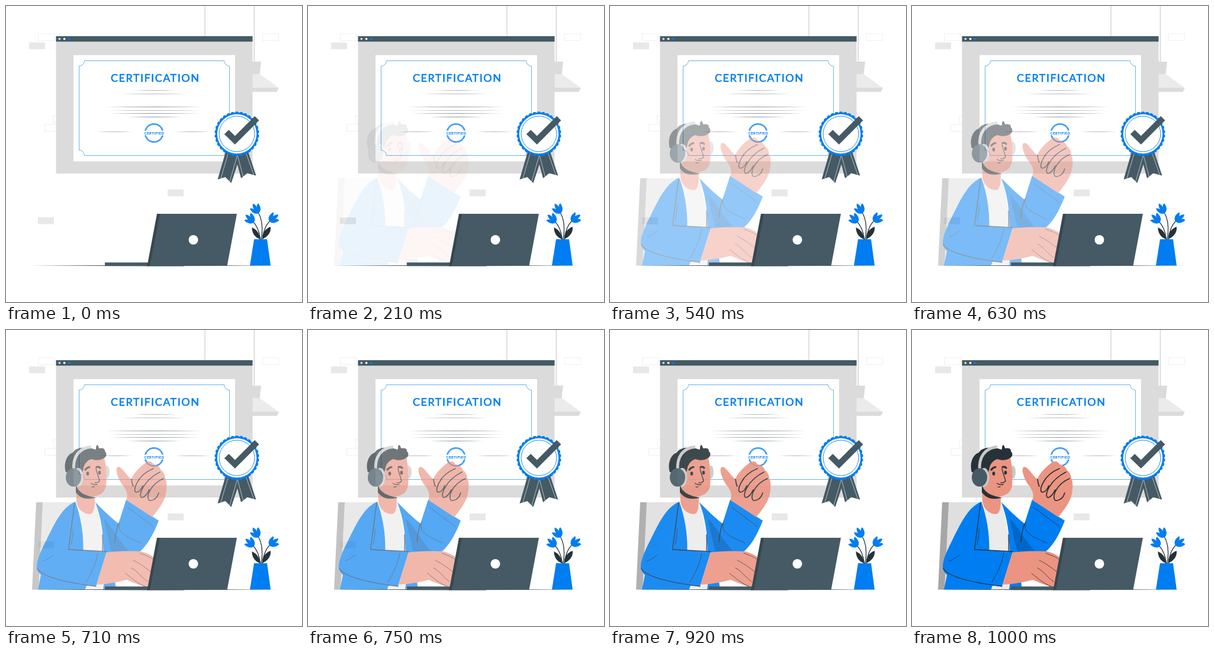
Animation of 500 by 500 pixels, one loop 1040 ms. Source, as an HTML page:

```html
<!DOCTYPE html>
<html lang="en">
<head>
<meta charset="utf-8">
<title>Certification</title>
<style>
  html, body { margin: 0; width: 100%; height: 100%; overflow: hidden; background: #fff; }
  svg { display: block; width: 100%; height: 100%; }
  text { font-family: Lato, Inter, sans-serif; fill: #007df0; stroke: #007df0; stroke-linejoin: round; }
  .blue { fill: #007df0; }
  .slate { fill: #455a64; }
  .ink { fill: #263238; }
  .skin { fill: #eb9481; }
  .pen { fill: none; stroke: #263238; stroke-width: 1.3; stroke-linecap: round; stroke-linejoin: round; }
  .thin { stroke-width: .8; }
  .bold { stroke-width: 1.7; }
  .ring { fill: none; stroke: #007df0; stroke-width: .6; }
  .cog { stroke-width: 2.2; stroke-dasharray: 1.7 .6; }
</style>
</head>
<body>
<svg viewBox="0 0 500 500">
  <g id="wall">
    <path d="M336 0V51M419.300 0V94" stroke="#a6a6a6" stroke-width=".7" fill="none"/>
    <g id="bricks"></g>
    <path d="M416 94H431L428.500 116H416Z" fill="#dbdbdb"/>
    <path d="M416 115H428.500L461 138.500H416Z" fill="#ebebeb"/>
    <path d="M416 138H461L457.500 145H416Z" fill="#dbdbdb"/>
  </g>

  <g id="window">
    <rect x="84.500" y="51" width="332" height="232" fill="#dbdbdb"/>
    <rect x="84.500" y="51" width="332" height="9.200" class="slate"/>
    <circle cx="90.300" cy="55.600" r="1.900" fill="#b9d9ee"/>
    <circle cx="98.600" cy="55.600" r="1.900" fill="#fff"/>
    <circle cx="106.900" cy="55.600" r="1.900" class="blue"/>
    <rect x="114" y="83" width="273" height="179.500" fill="#fff"/>
    <path class="ring" d="M132.500 92.500H368.500A9 9 0 0 0 377.500 101.500V243.500A9 9 0 0 0 368.500 252.500H132.500A9 9 0 0 0 123.500 243.500V101.500A9 9 0 0 0 132.500 92.500Z"/>
    <text x="177" y="127.800" font-size="18" letter-spacing="1.5" stroke-width=".6">CERTIFICATION</text>
    <g id="rules" fill="#607078"></g>
    <g id="seal">
      <path class="ring cog" d="M235.200 210.500A15.300 15.300 0 0 1 264.800 210.500M235.200 218.500A15.300 15.300 0 0 0 264.800 218.500"/>
      <path class="ring" d="M236.500 210A14.200 14.200 0 0 1 263.500 210M236.500 219A14.200 14.200 0 0 0 263.500 219"/>
      <text x="233.700" y="216.600" font-size="5.800" letter-spacing=".6" stroke-width=".25">CERTIFIED</text>
    </g>
  </g>

  <g id="person" opacity="0">
    <path d="M61 291H126L122 438.500H54Z" fill="#dfdfdf"/>
    <path d="M51 291H62L55 438.500H44Z" fill="#a6a6a6"/>

    <!-- torso -->
    <path d="M117 290H152L168 375L165 438.500H132Z" fill="#ebebeb"/>
    <path class="blue" d="M166 424H184L186 438.500H164Z"/>
    <path class="blue" d="M151 291C164 304 177 317 190 327L203 286.500L258 322C249 345 239 364 224 376H164.500C165 345 161 318 151 291Z"/>
    <path d="M165 319C179 330 184 347 208 374H178C173 355 169 337 165 319Z" fill="#0067c8"/>
    <path class="blue" d="M117 290C94 300 83 326 70 351C60 371 51 389 52 402C53 408 57 411 59 414L54 438.500H133.500L136 432L152 433L170 375L130.500 372C131 342 126 315 117 290Z"/>
    <path class="pen" d="M116 292C113 312 110 340 105.500 370.500C126 373 148 372 170 374.500M53 403C62 419 113 428 152 433M163 346Q164 360 163 373M190 327C186 338 185 347 184 358"/>
    <path class="pen thin" d="M155 377C152 395 143 413 135 426M206 300L249 332M192 324C187 340 196 346 228 360M63 390C68 389 74 384 80 380M110 362C112 352 114 344 113 336"/>

    <!-- typing hand -->
    <path class="skin" d="M170 375.500C190 373 215 373 229 374C239 377 247 381 252 386L241 434H235C223 430 213 426 204 422C191 425 178 429 153 430Z"/>
    <path class="pen thin" d="M212 402C222 407 229 418 239 425M215 389C228 395 237 403 247 410M202 411C211 418 223 429 235 433M226 377C236 381 244 383 250 389"/>

    <!-- raised hand -->
    <path class="skin" d="M203 287C207 280 204 271 197 262C190 253 184 236 188 232C194 227 204 247 212 252C214 244 224 233 236 224C241 221 247 221 249 227C255 227 260 232 262 237C267 240 269 247 269 251C272 255 272 268 270 277C267 291 257 304 247 316Z"/>
    <path class="pen bold" d="M249 234C237 239 227 247 222 257C217 266 216 273 220 274C225 274 229 268 231 263M260 240C248 246 238 255 232 265C226 275 226 283 230 283C235 282 239 276 242 270M266 251C256 255 247 263 242 273C238 283 240 289 245 288C251 287 256 282 258 275M212 252C213 257 213 261 215 264"/>

    <!-- head -->
    <path class="skin" d="M118 262L119 290C121 302 130 311 142 311C148 310 150 302 150 283Z"/>
    <path class="ink" d="M118 261V274C126 286 139 287 152 283C138 282 126 275 118 261Z"/>
    <ellipse cx="170.500" cy="240" rx="4.500" ry="11" fill="#c7c7c7"/>
    <path class="skin" d="M118 230C124 216 149 211 166 216C170 231 170 250 169 263C167 275 158 280 148 281C133 281 121 273 118 261Z"/>
    <path class="ink" d="M101 240C97 228 101 211 113 207C118 198 135 196 151 202C153 201 151 196 154 194C157 196 156 199 158 200C164 198 168 202 167 205C171 208 170 214 166 216C161 220 152 221 144 218C136 221 133 226 131 232C130 240 127 244 123 247Z"/>
    <path d="M114.500 238C112 214 124 199 144 197.500" fill="none" stroke="#c7c7c7" stroke-width="5"/>
    <ellipse cx="122" cy="249" rx="8.500" ry="16" fill="#c7c7c7"/>
    <ellipse cx="114" cy="249" rx="13" ry="15.500" class="slate"/>
    <ellipse cx="138" cy="242.500" rx="2.300" ry="3.200" class="ink"/>
    <ellipse cx="158" cy="241" rx="2.300" ry="3.200" class="ink"/>
    <path class="pen" style="stroke-width:3.200" d="M134 236Q137 232 141 231.500M153 231.500Q157 230.500 159 233"/>
    <path class="pen" d="M152 234C154 243 157 250 158 255Q155 259 150 258M143.500 259Q147 262 154 261M145 265Q147 266 149 264.500"/>
  </g>

  <g id="desk">
    <path class="ink" d="M40 438.500Q250 437.300 461 438.500Q250 439.800 40 438.500Z"/>
    <path class="slate" d="M167 433.300H241V439.300H167Z"/>
    <path d="M238 438H301V439.500H238Z" fill="#37474f"/>
    <path d="M255 351H263L245 439H238.500Z" fill="#37474f"/>
    <path class="slate" d="M260 351H390L373.500 439H243Z"/>
    <circle cx="316.500" cy="395" r="8" fill="#fff"/>
    <path class="pen" d="M431 394C434 378 433 360 426 349M429.500 394C428 381 424 371 417 364M433 394C435 379 440 368 447 362"/>
    <path class="ink" d="M429 394C420 391 415 382 415.500 374C424 378 429 385 429 394ZM433 394C432 384 438 376 447 373C448 382 443 389 433 394Z"/>
    <g id="flowers" class="blue"></g>
    <path class="blue" d="M419 394H441L447 438.500H412Z"/>
  </g>

  <g id="medal">
    <path class="slate" d="M372 243L357.500 293L370.500 289L380.500 299L397 249Z"/>
    <path class="slate" d="M386 249L397 291L407.500 282.500L422.500 286.500L408 243Z"/>
    <path d="M375.500 248L363 291M391 251L378 296M390.500 250L400.500 288M405 247L418.500 285" fill="none" stroke="#fff" stroke-width=".6"/>
    <path id="rosette" class="blue"/>
    <circle cx="390" cy="216" r="33.300" fill="#fff"/>
    <circle cx="390" cy="216" r="30" class="ring" style="stroke-width:.9"/>
    <path class="slate" d="M368.800 216.500L376.300 209.300L386.800 219.500L420.200 186L427.500 193.200L386.800 234Z"/>
  </g>
</svg>
<script>
const $ = id => document.getElementById(id);

// Thin line that narrows to a point at both ends.
const taper = (x1, x2, y) => {
  const mid = (x1 + x2) / 2;
  return `<path d="M${x1} ${y}Q${mid} ${y - 0.6} ${x2} ${y}Q${mid} ${y + 0.6} ${x1} ${y}Z"/>`;
};

const brick = ([x, y, filled]) => {
  const paint = filled ? 'fill="#e8e8e8"' : 'fill="none" stroke="#ebebeb" stroke-width=".8"';
  return `<rect x="${x}" y="${y}" width="27" height="11.500" ${paint}/>`;
};

// Bell with three pointed petals, rooted at the end of its stem.
const flower = ([x, y, turn]) =>
  `<path transform="translate(${x} ${y}) rotate(${turn})" d="M0 0C-7-1-9-8-8-15Q-4-14-3-10Q-2-17 1-19Q4-15 3-10Q5-14 9-14C9-8 7-1 0 0Z"/>`;

// Disc whose rim is a row of small round bumps.
const scallop = (cx, cy, r, count) => {
  const point = i => {
    const a = i / count * 2 * Math.PI;
    return `${(cx + r * Math.cos(a)).toFixed(2)} ${(cy + r * Math.sin(a)).toFixed(2)}`;
  };
  const bump = r * Math.sin(Math.PI / count) * 1.1;
  let d = `M${point(0)}`;
  for (let i = 1; i <= count; i++) d += `A${bump} ${bump} 0 0 1 ${point(i)}`;
  return d + 'Z';
};

$('bricks').innerHTML = [
  [39, 61.5, true], [273, 310, true], [54, 357, true],
  [54.5, 47], [433.5, 47], [80, 185.5], [65.5, 200], [419, 342], [433.5, 357]
].map(brick).join('');

$('rules').innerHTML = [
  [215, 287, 142.5], [194, 305, 148.5], [168, 333, 170.4], [171, 331, 176.5],
  [174, 328, 181.4], [205, 296, 187.4], [154, 214, 212.5], [285, 345, 212.5]
].map(r => taper(...r)).join('');

$('flowers').innerHTML = [[427, 350, -35], [419, 365, -52], [445, 364, 50]].map(flower).join('');
$('rosette').setAttribute('d', scallop(390, 216, 35.6, 30));

const LOOP = 1040, TICK = 1000 / 24, FIRST = 2, LAST = 24;

function render(ms) {
  const tick = Math.floor((ms % LOOP + 4.9) / TICK);
  const progress = Math.min(1, Math.max(0, (tick - FIRST) / (LAST - FIRST)));
  $('person').setAttribute('opacity', Math.pow(progress, 1.27).toFixed(3));
}

const start = performance.now();
function loop() {
  render(performance.now() - start);
  requestAnimationFrame(loop);
}
loop();
</script>
</body>
</html>
```
